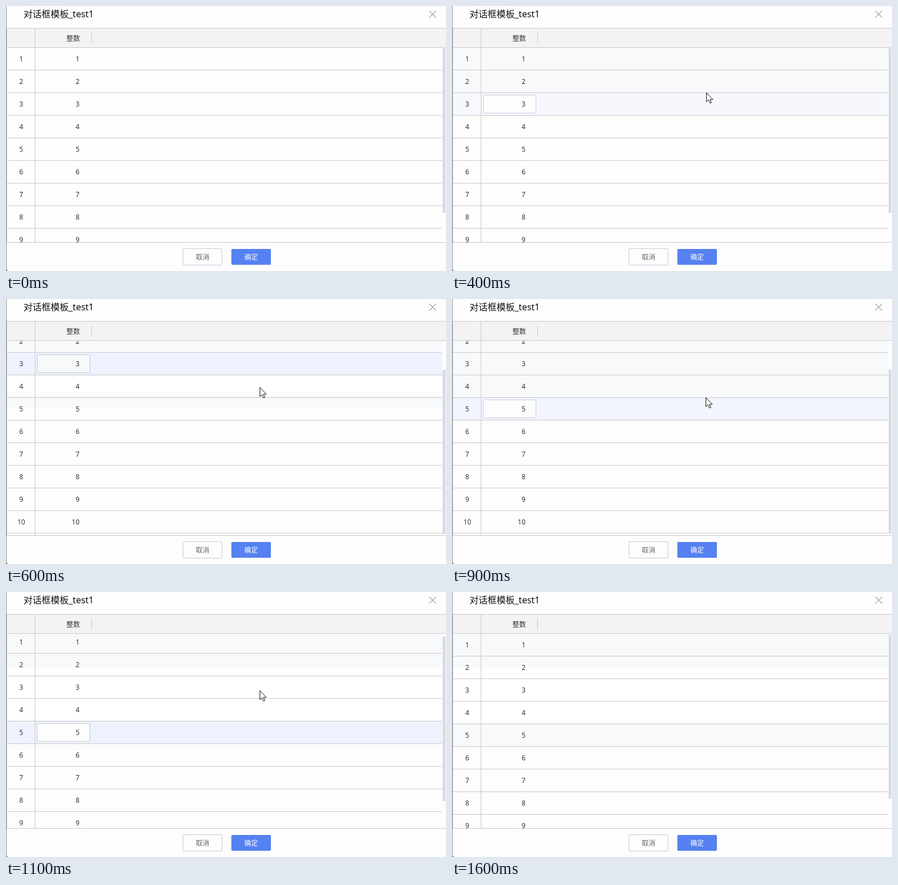
An HTML page that plays this animation: 779 by 469 pixels, repeating every 2.1 s.

```html
<!DOCTYPE html>
<html lang="zh-CN">
<head>
<meta charset="utf-8">
<title>Dialog table</title>
<style>
  html, body { margin: 0; width: 100%; height: 100%; overflow: hidden; background: #fdfdfd; }
  svg { display: block; width: 779px; height: 469px; }
  text { font: 12px "Noto Sans", "Noto Sans CJK SC", "Noto Sans CJK", sans-serif; fill: #333; }
  .title { font-size: 16px; fill: #111; }
  .mid { text-anchor: middle; }
  .end { text-anchor: end; }
  .crisp { shape-rendering: crispEdges; }
</style>
</head>
<body>
<svg viewBox="0 0 779 469">
  <defs><clipPath id="view"><rect x="2" y="74" width="777" height="344"/></clipPath></defs>
  <rect width="779" height="469" fill="#8f8f8f"/>
  <path d="M1 0H779V469H6Q1 469 1 464Z" fill="#fdfdfd"/>
  <text class="title" x="31" y="20">对话框模板_test1</text>
  <path d="M749.5 8.5L761.5 20.5M761.5 8.5L749.5 20.5" stroke="#62706a" fill="none"/>

  <g clip-path="url(#view)">
    <g id="bands" class="crisp"></g>
    <g id="rows">
      <rect id="hover" class="crisp" x="2" width="770" height="39"/>
      <rect id="field" x="55.5" width="93" height="32" rx="1" stroke="#c6cad6"/>
    </g>
    <rect id="thumb" class="crisp" x="773" y="75" width="5" height="291" fill="#dadae2"/>
  </g>

  <g class="crisp">
    <rect x="2" y="40" width="777" height="33" fill="#f3f3f3"/>
    <path d="M1 39.5H779M2 73.5H779M1 418.5H779M1.5 39V419M51.5 40V418M151.5 47V67"
          stroke="#c8c8c8" fill="none"/>
  </g>
  <text class="mid" x="119" y="62">整数</text>

  <rect x="313.5" y="429.5" width="69" height="29" rx="1.5" fill="#fdfdfd" stroke="#c6cad6"/>
  <rect x="399" y="430" width="70" height="28" rx="2" fill="#5581f1"/>
  <text class="mid" x="348" y="449" style="fill:#666">取消</text>
  <text class="mid" x="434" y="449" style="fill:#fff">确定</text>

  <path id="cursor" d="M.5 .5V16.5L4.2 13.1L6.8 19L9.3 18L6.8 12.3H11.8Z"
        fill="#fff" stroke="#111" stroke-linejoin="round"/>
</svg>
<script>
const LOOP = 2100, STEP = 100, TOP = 74, ROW = 40;
const PALE = '#f8f9fb', WHITE = '#fff', SOFT = '#f2f5fe', FULL = '#edf2fe';
const $ = id => document.getElementById(id);

function add(parent, tag, attrs, text = '') {
  const el = document.createElementNS('http://www.w3.org/2000/svg', tag);
  for (const k in attrs) el.setAttribute(k, attrs[k]);
  el.textContent = text;
  return parent.appendChild(el);
}

for (let i = 1; i <= 10; i++) {
  const y = TOP + ROW * (i - 1);
  add($('rows'), 'path', { class: 'crisp', d: `M2 ${y + 39.5}H772`, stroke: '#c8c8c8' });
  add($('rows'), 'text', { class: 'mid', x: 27, y: y + 24 }, i);
  add($('rows'), 'text', { class: 'end', x: 130, y: y + 24 }, i);
}

// Tinted stretches of the table: from, to, colour
const head = [74, 134, PALE];
const last = [head, [134, 234, WHITE], [234, 273, PALE]];

// One entry per step; the last one holds until the loop ends
const steps = [
  {},
  { at: [492, 45] },
  { at: [474, 92], row: 1, tint: '#f7f8fe' },
  { at: [456, 128], row: 2, tint: '#f7f8fe', bands: [[74, 113, PALE]] },
  { at: [450, 153], row: 3, tint: '#f7f8fe', bands: [[74, 153, PALE]] },
  { at: [449, 156], row: 3, scroll: 24, bands: [[74, 130, PALE], [170, 194, PALE]] },
  { at: [449, 156], row: 3, scroll: 59, fill: PALE,
    bands: [[74, 95, PALE], [134, 170, WHITE], [170, 194, PALE]] },
  { at: [449, 162], row: 4, scroll: 59, tint: SOFT, bands: [[74, 194, PALE]] },
  { at: [449, 169], row: 4, scroll: 59, bands: [[74, 194, PALE]] },
  { at: [449, 174], row: 5, scroll: 59, tint: SOFT, bands: [[74, 175, PALE]] },
  { at: [449, 174], row: 5, scroll: 43, bands: [[74, 175, PALE]] },
  { at: [449, 174], row: 5, scroll: 5, bands: [head, [134, 229, WHITE]] },
  { at: [449, 174], row: 5, bands: last },
  { at: [449, 175], row: 3, tint: SOFT, fill: WHITE, bands: last },
  { at: [540, 177], row: 3, fill: WHITE, bands: last },
  { at: [678, 180], row: 3, fill: WHITE, bands: last },
  { bands: last }
];

function show(el, on) { el.setAttribute('visibility', on ? 'visible' : 'hidden'); }

function draw({ at, row, scroll = 0, tint = FULL, fill = '#fdfdfd', bands = [] }) {
  $('rows').setAttribute('transform', `translate(0 ${-scroll})`);
  $('thumb').setAttribute('y', 75 + Math.round(scroll * 50 / 59));
  show($('hover'), row);
  show($('field'), row);
  show($('cursor'), at);
  if (row) {
    const y = TOP + ROW * (row - 1);
    $('hover').setAttribute('y', y);
    $('hover').setAttribute('fill', tint);
    $('field').setAttribute('y', y + 3.5);
    $('field').setAttribute('fill', fill);
  }
  if (at) $('cursor').setAttribute('transform', `translate(${at})`);
  $('bands').textContent = '';
  for (const [from, to, color] of bands)
    add($('bands'), 'rect', { x: 2, y: from, width: 770, height: to - from, fill: color });
}

let shown = -1;
function tick() {
  const t = performance.now() % LOOP;
  const i = Math.min(Math.floor(t / STEP), steps.length - 1);
  if (i !== shown) draw(steps[shown = i]);
  requestAnimationFrame(tick);
}
tick();
</script>
</body>
</html>
```
